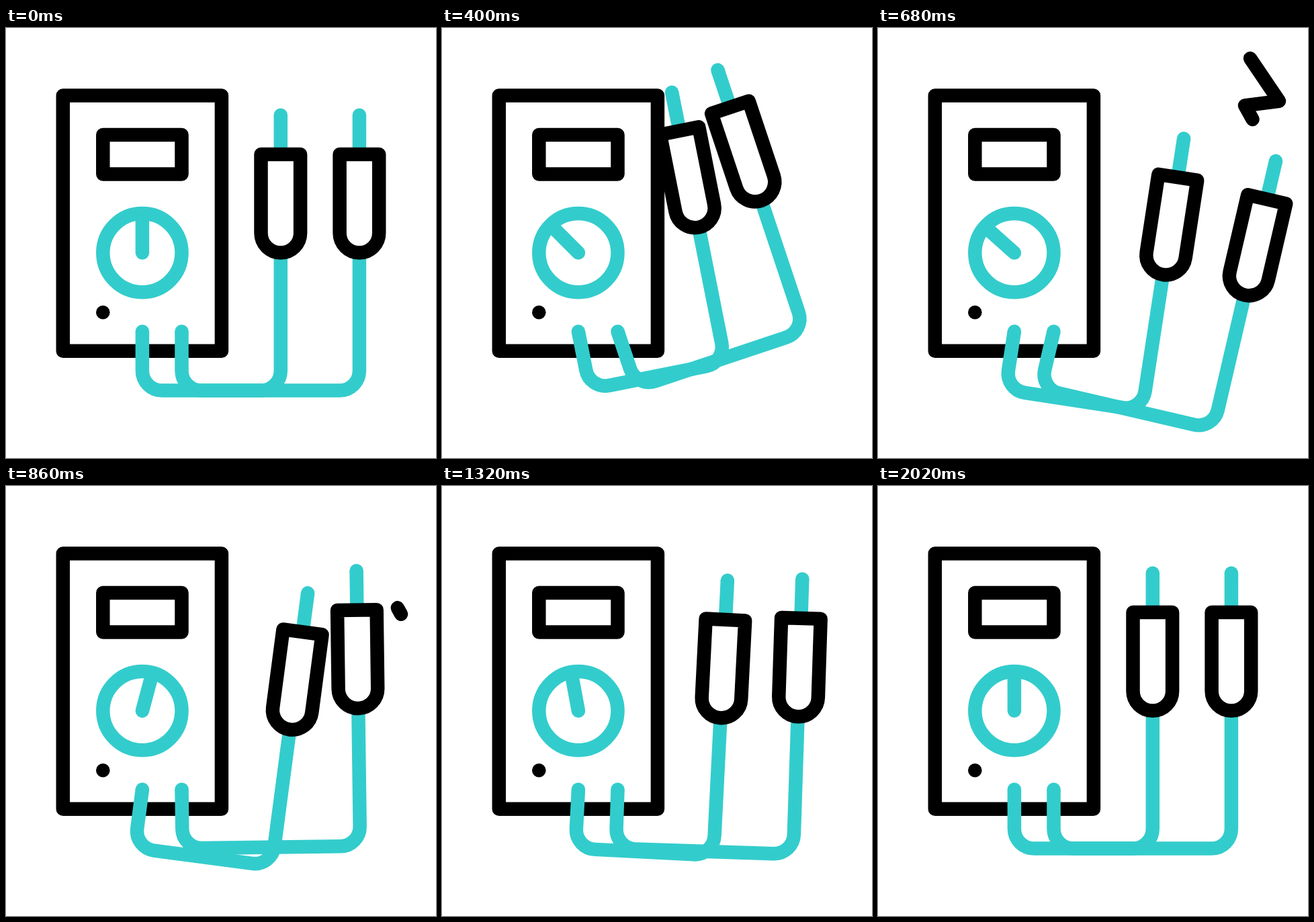
Write an HTML page with a canvas that moves like this. It is 640 by 640 pixels and loops after 2.4 s.

```html
<!DOCTYPE html>
<html lang="en">
<head>
<meta charset="utf-8">
<title>Multimeter</title>
<style>
html, body { margin: 0; height: 100%; overflow: hidden; background: #fff; }
canvas { display: block; width: 100vw; height: 100vh; }
</style>
</head>
<body>
<canvas id="stage" width="640" height="640"></canvas>
<script>
const ctx = document.getElementById('stage').getContext('2d');
const LOOP = 2400, STEP = 20;
const INK = '#000', TEAL = '#33cccc';
const RAD = Math.PI / 180;

// [time in ms, angle in degrees]
const NEEDLE = [[0, 0], [592, -59.6], [1060, 63], [1520, -60], [2015, 0]];
const LEAD_A = [[80, 0], [491, -12.85], [758, 14.3], [1025, -6.5], [1292, 3], [1560, 0]];
const LEAD_B = [[0, 0], [412, -18.5], [679, 13.1], [946, -5.25], [1213, 2.9], [1480, 0]];

const BOLT = [[0, 0], [44, 65], [-7, 71.5], [35, 147]];
const BOLT_LEN = BOLT.slice(1).reduce(
  (sum, p, i) => sum + Math.hypot(p[0] - BOLT[i][0], p[1] - BOLT[i][1]), 0);
const BOLT_TIME = 222, BOLT_LAG = 131;

const smooth = u => {
  u = Math.min(1, Math.max(0, u));
  return u * u * (3 - 2 * u);
};

function angleAt(keys, t) {
  let a = keys[0][1];
  for (let i = 1; i < keys.length; i++) {
    const [t0, a0] = keys[i - 1], [t1, a1] = keys[i];
    if (t > t0) a = a0 + (a1 - a0) * smooth((t - t0) / (t1 - t0));
  }
  return a * RAD;
}

function stroke(color, trace, cap = 'butt') {
  ctx.strokeStyle = color;
  ctx.lineCap = cap;
  ctx.beginPath();
  trace();
  ctx.stroke();
}

function dot(x, y, r, color) {
  ctx.fillStyle = color;
  ctx.beginPath();
  ctx.arc(x, y, r, 0, 7);
  ctx.fill();
}

function pivot(x, y, angle, draw) {
  ctx.save();
  ctx.translate(x, y);
  ctx.rotate(angle);
  draw();
  ctx.restore();
}

function meter(t) {
  stroke(INK, () => ctx.rect(84.8, 100.4, 236.1, 380.3));
  stroke(INK, () => ctx.rect(144.3, 159, 117.2, 58.5));
  dot(144.3, 423.2, 10.3, INK);
  stroke(TEAL, () => ctx.arc(202.9, 334.6, 58.6, 0, 7));
  pivot(202.9, 334.6, angleAt(NEEDLE, t), () =>
    stroke(TEAL, () => { ctx.moveTo(0, 0); ctx.lineTo(0, -57); }, 'round'));
}

// Cable, probe and tip, drawn around the plug; x is the probe's offset
function lead(plugX, x, angle) {
  pivot(plugX, 451.7, angle, () => {
    stroke(TEAL, () => {
      ctx.moveTo(0, 0);
      ctx.arcTo(0, 87.8, 29, 87.8, 29.2);
      ctx.arcTo(x, 87.8, x, 0, 29.2);
      ctx.lineTo(x, -117);
    });
    dot(0, 0, 10.25, TEAL);
    stroke(TEAL, () => { ctx.moveTo(x, -322); ctx.lineTo(x, -263.6); });
    dot(x, -322, 10.25, TEAL);
    stroke(INK, () => {
      ctx.moveTo(x - 29.3, -263.6);
      ctx.lineTo(x + 29.3, -263.6);
      ctx.lineTo(x + 29.3, -146.4);
      ctx.arc(x, -146.4, 29.3, 0, Math.PI);
      ctx.closePath();
    });
  });
}

function bolt(x, y, start, color, t) {
  const head = smooth((t - start) / BOLT_TIME);
  const tail = smooth((t - start - BOLT_LAG) / BOLT_TIME);
  if (head <= tail) return;
  ctx.save();
  ctx.translate(x, y);
  ctx.setLineDash([(head - tail) * BOLT_LEN, 2 * BOLT_LEN]);
  ctx.lineDashOffset = -tail * BOLT_LEN;
  stroke(color, () => BOLT.forEach(p => ctx.lineTo(...p)), 'round');
  ctx.restore();
}

function draw(t) {
  ctx.fillStyle = '#fff';
  ctx.fillRect(0, 0, 640, 640);
  ctx.lineWidth = 20.5;
  ctx.lineJoin = 'round';
  meter(t);
  lead(202.9, 205.9, angleAt(LEAD_A, t));
  lead(261.5, 264.4, angleAt(LEAD_B, t));
  bolt(553, 43.8, 537, INK, t);
  bolt(453, 132, 940, TEAL, t);
  bolt(408, 24.3, 1387, INK, t);
}

const begin = performance.now();
function tick(now) {
  const t = Math.max(0, now - begin) % LOOP;
  draw(Math.floor(t / STEP) * STEP);
  requestAnimationFrame(tick);
}
draw(0);
requestAnimationFrame(tick);
</script>
</body>
</html>
```
